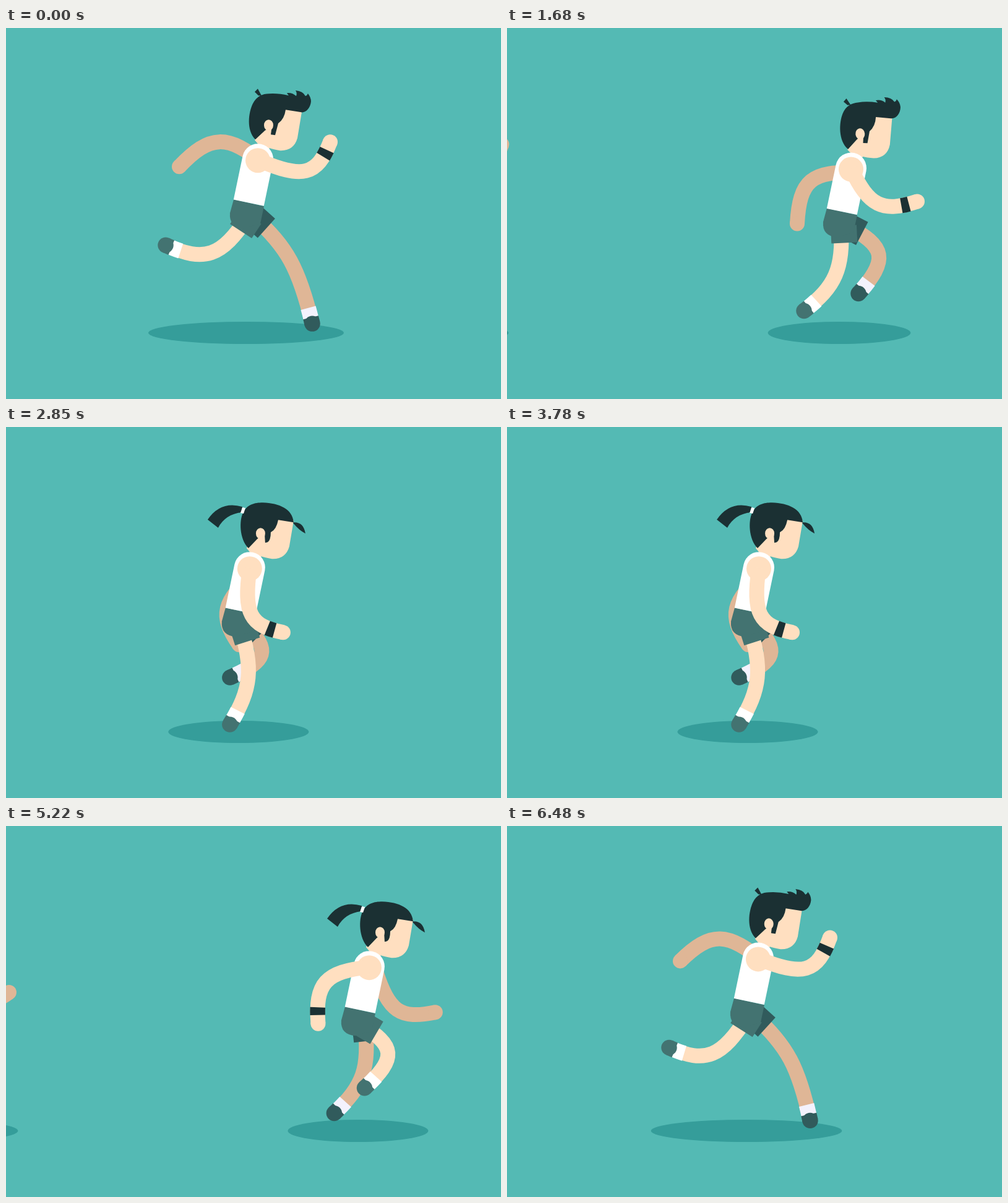
These frames come from a looping animation (800x600 px, 6.51 s). An HTML page with a canvas:

```html
<!DOCTYPE html>
<html>
<head>
<meta charset="utf-8">
<title>Runners</title>
<style>
html, body { margin: 0; height: 100%; overflow: hidden; background: #54bab4; }
canvas { display: block; }
</style>
</head>
<body>
<canvas id="stage" width="800" height="600"></canvas>
<script>
const ctx = document.getElementById('stage').getContext('2d');
const LOOP = 6510, CYCLE = 930, FRAME = 30, GAP = 692;
const HAIR = '#1b3033';
const NEAR = { skin: '#ffdfc0', cloth: '#437371', sock: '#fff', shoulder: [407, 213], hip: [391, 305] };
const FAR = { skin: '#dfb696', cloth: '#315b5c', sock: '#f3f2fd', shoulder: [418, 220], hip: [400, 305] };

// Limb poses over one stride: time, bend x, y, end x, y (relative to the joint)
const ARM = [
  [0, 97, 50, 117, -29], [60, 83, 81, 121, 7], [225, -80, 58, -28, 117],
  [285, -102, -15, -98, 82], [435, -77, -76, -137, -3], [465, -77, -74, -138, 4],
  [525, -114, -52, -128, 40], [690, -21, 99, 54, 104], [750, 33, 86, 107, 53],
  [900, 97, 48, 116, -34]
];
const LEG = [
  [0, -51, 93, -133, 46], [60, -52, 93, -128, 47], [225, 64, 53, -25, 85],
  [285, 94, 39, 19, 110], [435, 72, 57, 91, 170], [465, 72, 56, 95, 173],
  [525, 70, 56, 91, 174], [690, 35, 90, -16, 161], [750, 11, 92, -60, 138],
  [900, -52, 97, -128, 52]
];

const path = d => new Path2D(d);
const FACE = path('M420 140L452 128 478 136 471 178Q465 199 443 198Q432 196 426 194L418 200 402 181Z');
const MAN_HAIR = path('M403 180C388 165 392 136 399 122C405 110 415 106 425 106Q440 105 457 109L454 105Q463 104 469 110Q471 105 468 101Q480 102 484 110Q487 109 488 106Q493 112 493 119C492 130 484 138 476 136L452 132Q450 147 440 154L435 173 428 172 430 157 418 166Z M402 103L407 98 413 109 408 109Z');
const GIRL_HAIR = path('M405 181C390 166 390 136 396 124C402 110 415 107 428 107C455 108 476 117 478 139L453 135Q450 151 441 155Q441 168 436 171L432 172 431 156 419 166Z M478 139Q494 138 497 157Q487 152 477 140Z');
const PONYTAIL = path('M395 114Q360 104 339 135L356 148Q368 126 394 123Z');
const TIE = path('M395 115L400 116 397 125 392 124Z');
const PELVIS = path('M368 277L417 288 411 316 385 324Q360 322 362 299Z');

const wrap = (v, n) => ((v % n) + n) % n;

// Smooth periodic curve through the rows
function pose(rows, time) {
  const n = rows.length, t = wrap(time, CYCLE);
  let i = n - 1;
  while (rows[i][0] > t) i--;
  const row = k => rows[wrap(k, n)];
  const at = k => row(k)[0] + Math.floor(k / n) * CYCLE;
  const slope = (k, c) => (row(k + 1)[c] - row(k)[c]) / (at(k + 1) - at(k));
  const tangent = (k, c) => {
    const a = at(k) - at(k - 1), b = at(k + 1) - at(k);
    return (slope(k - 1, c) * b + slope(k, c) * a) / (a + b);
  };
  const h = at(i + 1) - at(i), u = (t - at(i)) / h, v = 1 - u;
  return [1, 2, 3, 4].map(c =>
    v * v * (1 + 2 * u) * row(i)[c] + u * u * (3 - 2 * u) * row(i + 1)[c] +
    h * u * v * (v * tangent(i, c) - u * tangent(i + 1, c)));
}

// Cubic easing with handles (.3, 0) and (.2, 1)
function ease(x) {
  if (x <= 0) return 0;
  if (x >= 1) return 1;
  let lo = 0, hi = 1, s;
  for (let i = 0; i < 20; i++) {
    s = (lo + hi) / 2;
    const v = 1 - s;
    if (.9 * v * v * s + .6 * v * s * s + s * s * s < x) lo = s; else hi = s;
  }
  return s * s * (3 - 2 * s);
}

function fill(shape, color) {
  ctx.fillStyle = color;
  ctx.fill(shape);
}

function ellipse(x, y, rx, ry, color) {
  ctx.fillStyle = color;
  ctx.beginPath();
  ctx.ellipse(x, y, rx, ry, 0, 0, 7);
  ctx.fill();
}

function stroke(shape, color, width, dash = []) {
  ctx.strokeStyle = color;
  ctx.lineWidth = width;
  ctx.setLineDash(dash);
  ctx.stroke(shape);
}

// Curve drawn from the hand or foot back to the joint
function limb([x, y], rows, time) {
  const [qx, qy, hx, hy] = pose(rows, time);
  const ax = .667 * qx + .067 * hx, ay = .667 * qy + .067 * hy;
  const curve = new Path2D();
  curve.moveTo(x + hx, y + hy);
  curve.bezierCurveTo(x + ax + .2 * hx, y + ay + .2 * hy, x + ax, y + ay, x, y);
  return { curve, x: x + hx, y: y + hy, angle: Math.atan2(ay, ax) };
}

function arm(side, time, band) {
  const a = limb(side.shoulder, ARM, time);
  stroke(a.curve, side.skin, 24);
  ellipse(a.x, a.y, 12, 12, side.skin);
  if (band) stroke(a.curve, HAIR, 24.5, [0, 14, 12.5, 999]);
}

function leg(side, time) {
  const l = limb(side.hip, LEG, time), [x, y] = side.hip;
  stroke(l.curve, side.skin, 24);
  stroke(l.curve, side.sock, 25, [0, 9, 17, 999]);
  stroke(l.curve, side.cloth, 25.5, [10, 999]);
  ellipse(l.x, l.y, 12.7, 12.7, side.cloth);
  const short = new Path2D(), sx = x + (side === NEAR ? 4 : 0);
  short.moveTo(sx, y);
  short.lineTo(sx + 28 * Math.cos(l.angle), y + 28 * Math.sin(l.angle));
  stroke(short, side.cloth, 42);
}

function turn(x, y, degrees) {
  ctx.translate(x, y);
  ctx.rotate(degrees * Math.PI / 180);
  ctx.translate(-x, -y);
}

function head(girl, dip) {
  ctx.save();
  turn(420, 190, girl ? 5 * (1 - dip) : -5 * dip);
  if (girl) {
    ctx.save();
    turn(395, 119, 6 * (1 - dip));
    fill(PONYTAIL, HAIR);
    ctx.restore();
  }
  fill(FACE, NEAR.skin);
  fill(girl ? GIRL_HAIR : MAN_HAIR, HAIR);
  if (girl) fill(TIE, '#fff');
  ellipse(424.5, 157, 7.5, 9, NEAR.skin);
  ctx.restore();
}

function shirt() {
  ctx.save();
  ctx.translate(407, 212);
  ctx.rotate(.206);
  ctx.fillStyle = '#fff';
  ctx.beginPath();
  ctx.arc(0, 0, 25, Math.PI, 0);
  ctx.lineTo(25, 72);
  ctx.lineTo(-25, 72);
  ctx.fill();
  ctx.restore();
}

function runner(offset, time, girl) {
  if (Math.abs(offset) > 640) return;
  const other = time + CYCLE / 2;
  const dip = (1 - Math.cos(4 * Math.PI * (time - 15) / CYCLE)) / 2;
  ctx.save();
  ctx.translate(offset, 0);
  ellipse(girl ? 389 : 388, 493, 158.5 - 46 * dip, 18, '#359d9a');
  ctx.translate(0, 15.5 * dip);
  arm(FAR, other);
  leg(FAR, other);
  head(girl, dip);
  leg(NEAR, time);
  fill(PELVIS, NEAR.cloth);
  shirt();
  ellipse(407, 214, 20, 20, NEAR.skin);
  arm(NEAR, time, true);
  ctx.restore();
}

const start = performance.now();

function draw(now) {
  const t = Math.floor(wrap(now - start, LOOP) / FRAME) * FRAME;
  const second = t > 4000;
  const lead = GAP * (second ? ease((t - 4850) / 1720) : ease((t - 1311) / 1875));
  ctx.fillStyle = '#54bab4';
  ctx.fillRect(0, 0, 800, 600);
  runner(second ? lead - GAP : lead, t, false);
  runner(second ? lead : lead - GAP, t - 300, true);
  requestAnimationFrame(draw);
}
draw(start);
</script>
</body>
</html>
```
